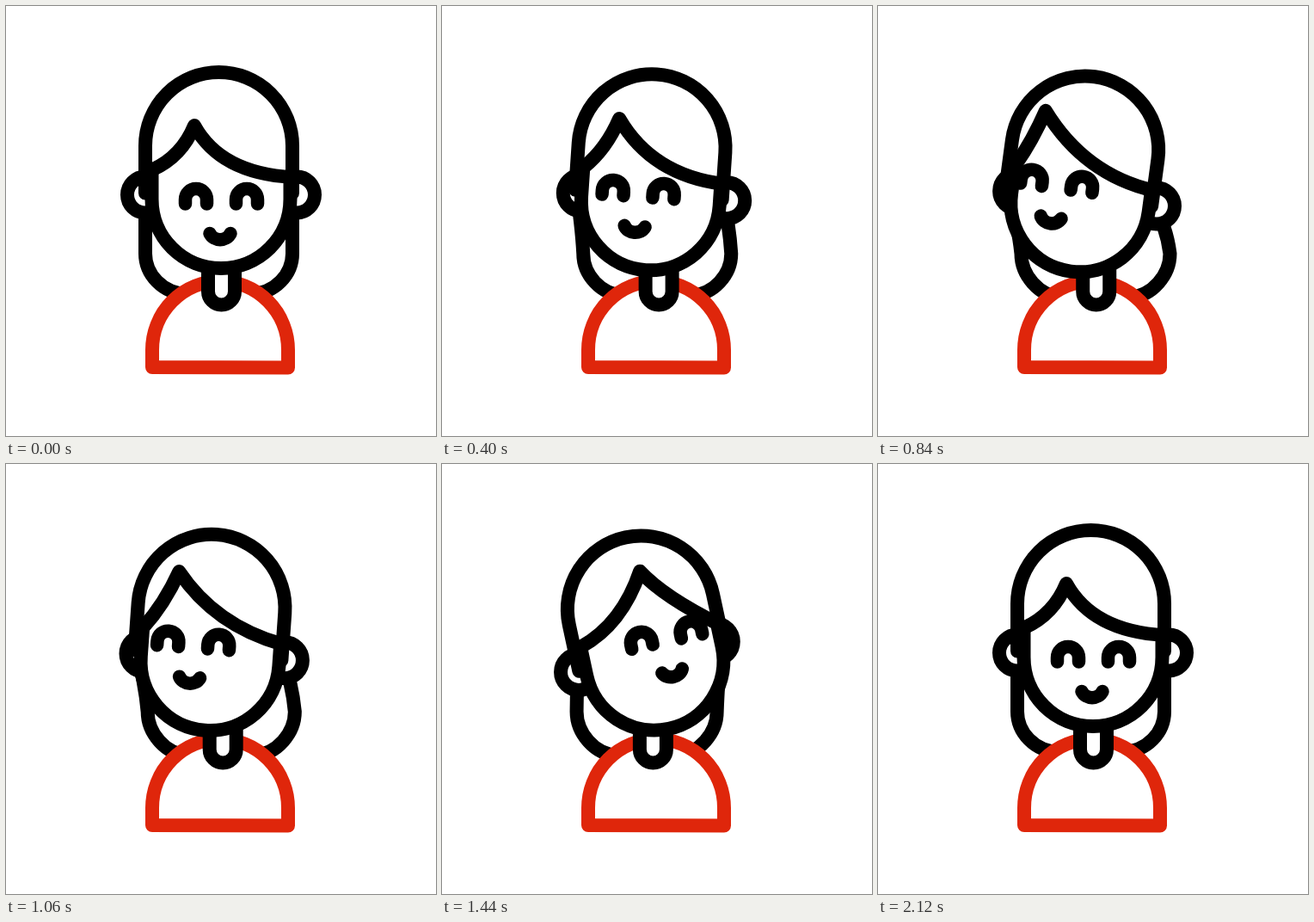
An HTML page with a canvas for the animation above (2.4 s loop, 500 px wide and 500 px high).

```html
<!DOCTYPE html>
<html lang="en">
<head>
<meta charset="utf-8">
<title>Girl looking around</title>
<style>
html, body { margin: 0; width: 100%; height: 100%; overflow: hidden; background: #fff; }
canvas { display: block; }
</style>
</head>
<body>
<canvas id="stage" width="500" height="500"></canvas>
<script>
const ctx = document.getElementById('stage').getContext('2d');
const LOOP = 2400, LEFT_AT = 800, RIGHT_AT = 1530, REST_AT = 2120;
const RED = '#df260b';

// Eased 0 to 1 between two times
function ease(t, from, to) {
  const u = Math.min(1, Math.max(0, (t - from) / (to - from)));
  return u < 0.5 ? 4 * u ** 3 : 1 - 4 * (1 - u) ** 3;
}

function draw(path, { fill, color = '#000', width = 16 } = {}) {
  const p = new Path2D(path);
  if (fill) { ctx.fillStyle = '#fff'; ctx.fill(p); }
  ctx.strokeStyle = color;
  ctx.lineWidth = width;
  ctx.stroke(p);
}

function render(t) {
  const away = ease(t, 0, LEFT_AT), across = ease(t, LEFT_AT, RIGHT_AT);
  const back = ease(t, RIGHT_AT, REST_AT);
  const turn = 2 * across - away - back;   // -1 looks left, 1 looks right
  const lift = away - back;                // chin up while looking aside

  const tilt = -10 * turn - 2.3 * lift;
  const angle = tilt * Math.PI / 180, c = Math.cos(angle), s = Math.sin(angle);
  const hx = 247.5 - 4.7 * turn - 11.5 * lift;
  const hy = 162.5 + turn + 5.5 * lift;
  const onHead = (x, y) => [hx + x * c - y * s, hy + x * s + y * c];

  ctx.fillStyle = '#fff';
  ctx.fillRect(0, 0, 500, 500);
  ctx.lineCap = ctx.lineJoin = 'round';

  // Loose hair behind the shoulders
  function lock(side, bulge) {
    const [x, y] = onHead(side * 85.5, 50), low = 335 + 4 * lift;
    draw(`M${x} ${y}Q${bulge * 0.8 + x * 0.2} 255 ${bulge} 288
      C${bulge} 312 ${bulge - side * 20} ${low - 1} ${bulge - side * 48} ${low}`);
  }
  lock(-1, 162 - 5 * turn - 0.5 * lift);
  lock(1, 333 - 10 * turn - 3.5 * lift);

  draw('M170 420V400A79 80 0 0 1 328 400V420.5Z', { fill: true, color: RED });
  draw(`M${235 + tilt * 0.42} 305V332a15.5 15.5 0 0 0 31 0V305`, { fill: true });

  // The ear on the far side slides in behind the head
  for (const side of [-1, 1]) {
    const [x, y] = onHead(2.5 + side * 117, 57);
    const cx = x - 7.5 * turn - side * (29 + 6 * lift), cy = y + side * 7 * turn;
    draw(`M${cx - 21} ${cy}a21 21 0 0 1 42 0a21 21 0 0 1 -42 0z`, { fill: true });
  }

  ctx.save();
  ctx.translate(hx, hy);
  ctx.rotate(angle);
  draw('M-85.5 55V0A85.5 85.5 0 0 1 85.5 0V55', { fill: true });
  draw('M-78 28V62A80.5 80.5 0 0 0 83 62V37', { fill: true });
  ctx.translate(3 + 24.7 * turn - 5.5 * lift, 58.5 - 2.9 * turn - 21.6 * lift);
  for (const x of [-42, 17]) draw(`M${x} 9v-5a12.5 12.5 0 0 1 25 0v5`, { width: 15.5 });
  draw('M-13.5 43.5C-9 53 6 53 10.5 43.5', { width: 15.5 });
  ctx.restore();

  // Fringe: its ends follow the head, the parting drifts further
  const [ax, ay] = onHead(-77.5, 28), [bx, by] = onHead(85.5, 36.5);
  const [px, py] = onHead(-28.5 + 30 * turn + 7 * lift, -23.5 - 2.5 * turn - 17.6 * lift);
  const bend = 0.2 + 0.07 * (turn - lift);
  const sagX = 0.27 - 0.03 * turn + 0.06 * lift, sagY = 0.93 - 0.16 * turn - 0.29 * lift;
  draw(`M${ax} ${ay}Q${ax + (0.5 + bend) * (px - ax)} ${ay + (0.5 - bend) * (py - ay)} ${px} ${py}
    Q${px + sagX * (bx - px)} ${py + sagY * (by - py)} ${bx} ${by}`);
}

const start = performance.now();
function frame() {
  render((performance.now() - start) % LOOP);
  requestAnimationFrame(frame);
}
frame();
</script>
</body>
</html>
```
